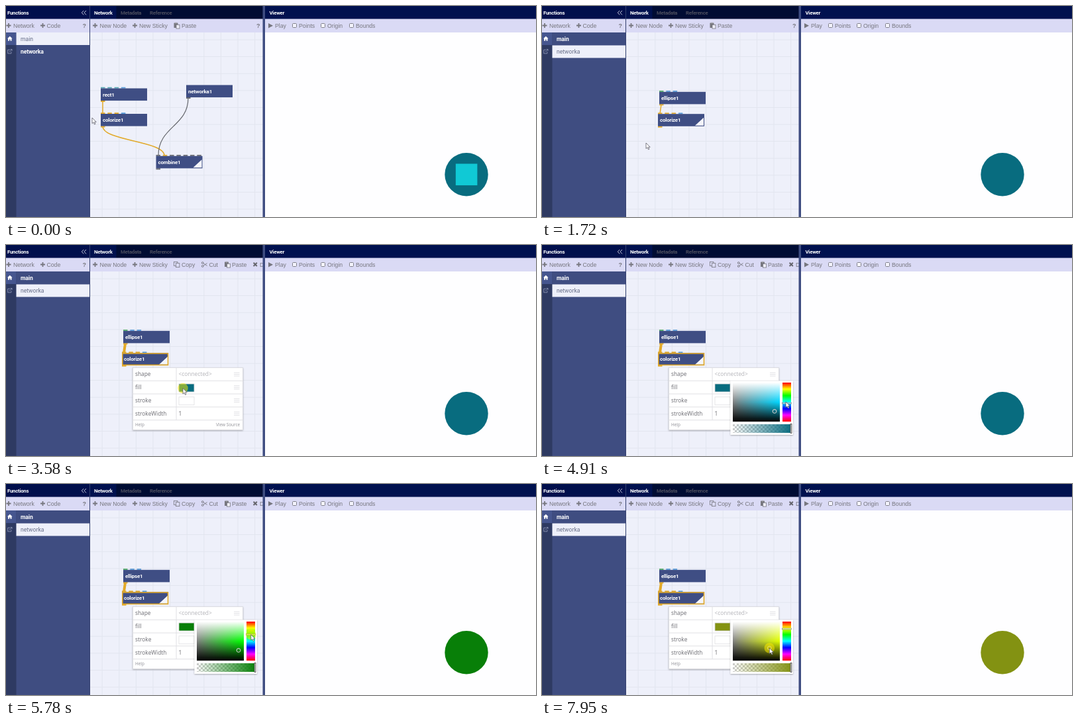
Recreate the animation shown at these times as an HTML page. Size 800 by 319 pixels, loop 8 s.

```html
<!DOCTYPE html>
<html lang="en">
<head>
<meta charset="utf-8">
<title>Node editor</title>
<style>
html, body { margin: 0; width: 100%; height: 100%; overflow: hidden; background: #fefeff; }
svg { display: block; width: 100vw; height: 100vh; }
text { white-space: pre; }
.bold { font: 700 8px Roboto, sans-serif; letter-spacing: -.22px; fill: #fff; }
.tab { font: 700 7.8px Roboto, sans-serif; letter-spacing: -.25px; fill: #fff; }
.dim { fill: #4b4d5e; }
.row { font: 700 8.6px Roboto, sans-serif; letter-spacing: -.15px; fill: #fff; }
.row.active { font-weight: 400; letter-spacing: 0; fill: #666d88; }
.tool { font: 8.7px "Liberation Sans", Arial, sans-serif; fill: #77777f; }
.help { font: 700 9px "Liberation Sans", Arial, sans-serif; fill: #77777f; }
.label { font: 8.3px "Noto Sans", sans-serif; fill: #74747a; }
.faint { fill: #b9b9be; }
.foot { font: 6.4px "Noto Sans", sans-serif; fill: #96969c; }
</style>
</head>
<body>
<svg id="stage" viewBox="0 0 800 319" preserveAspectRatio="none">
  <defs>
    <linearGradient id="toGrey"><stop stop-color="#808080"/><stop offset="1" stop-color="#808080" stop-opacity="0"/></linearGradient>
    <linearGradient id="light" x2="0" y2="1">
      <stop stop-color="#fff"/><stop offset=".5" stop-color="#fff" stop-opacity="0"/>
      <stop offset=".5" stop-color="#000" stop-opacity="0"/><stop offset="1"/>
    </linearGradient>
    <linearGradient id="hues" x2="0" y2="1"></linearGradient>
    <linearGradient id="alpha">
      <stop class="tint" stop-opacity="0"/><stop class="tint" offset="1"/>
    </linearGradient>
    <pattern id="checker" x="288" y="271" width="6" height="6" patternUnits="userSpaceOnUse">
      <path d="M0 0h6v6h-6z" fill="#fff"/><path d="M0 0h3v6h3v-3h-6z" fill="#ccc"/>
    </pattern>
    <filter id="shadow" x="-10%" y="-10%" width="120%" height="125%">
      <feDropShadow dx="0" dy="1" stdDeviation="1.3" flood-opacity=".3"/>
    </filter>
  </defs>
</svg>
<script>
const LOOP = 8000;
const NAVY = '#3f4e84', ORANGE = '#e2a928', BLUE = '#5b9fdc', TEAL = '#58a9b4', GREEN = '#4fae63', GREY = '#67696f';
const stage = document.getElementById('stage');

const rect = (x, y, w, h, fill, more = '') => `<rect x="${x}" y="${y}" width="${w}" height="${h}" fill="${fill}" ${more}/>`;
const text = (x, y, str, cls) => `<text x="${x}" y="${y}" class="${cls}">${str}</text>`;
const line = (d, stroke, width = 1) => `<path d="${d}" fill="none" stroke="${stroke}" stroke-width="${width}"/>`;
const group = (id, body) => `<g id="${id}">${body}</g>`;

const plus = x => line(`M${x} 29.5h7m-3.5 -3.5v7`, '#77777f', 1.8);
const pasteIcon = x => rect(x, 25.5, 6, 7.5, '#77777f', 'rx=".6"')
  + rect(x + 1.7, 24.8, 2.6, 1.6, '#aaaab4') + rect(x + 3.5, 28.3, 5, 5.8, '#eeeef8', 'stroke="#77777f" stroke-width=".8"');
const copyIcon = x => [0, 3].map(d =>
  rect(x + d, 25.5 + d * .7, 5.4, 6, '#dadaf5', 'stroke="#77777f" stroke-width=".8"')).join('');
const scissors = x => line(`M${x + 2.5} 27.3l6 4.2M${x + 2.5} 31.7l6 -4.2`, '#77777f', .9)
  + [27, 32].map(y => `<circle cx="${x + 1.7}" cy="${y}" r="1.4" fill="none" stroke="#77777f" stroke-width=".9"/>`).join('');
const checkbox = (x, label) => rect(x + .5, 26.5, 6, 6, '#f4f4fd', 'rx="1" stroke="#77777f" stroke-width=".9"')
  + text(x + 10, 32.7, label, 'tool');

function node(x, y, name, inputs, output, rendered) {
  return inputs.map((c, i) => rect(x + i * 10.3, y - 1.8, 6.5, 1.8, c)).join('')
    + rect(x, y + 18.5, 6.5, 2, output)
    + rect(x, y, 70, 18.6, NAVY)
    + text(x + 3, y + 12.2, name, 'bold')
    + (rendered ? `<path d="M${x + 69} ${y + 5.5}v12h-13z" fill="#f4f5fb"/>` : '');
}

function sidebar(id, activeRow) {
  const rows = ['main', 'networka'].map((name, i) => {
    const y = 40 + i * 19.5, active = i === activeRow;
    return (active ? rect(15.5, y, 110.5, 19, '#eef0fa') : '')
      + text(22, y + 12.6, name, active ? 'row active' : 'row');
  });
  return group(id, rows.join(''));
}

function grid() {
  let d = '';
  for (let x = 145.2; x < 388; x += 25.6) d += `M${x} 40v279`;
  for (let y = 51; y < 319; y += 25.6) d += `M127 ${y}h261`;
  return rect(127, 40, 261, 279, '#eef0fa') + line(d, '#e2e5ef', 1);
}

function mainNetwork() {
  return line('M146 144V163M146 182C146 204 239 204 239 226', ORANGE, 1.5)
    + line('M275 139C275 182 230 182 230 226', GREY, 1.2)
    + node(143, 124.5, 'rect1', [TEAL, TEAL, TEAL, BLUE], ORANGE)
    + node(143, 163, 'colorize1', [ORANGE, ORANGE, ORANGE, BLUE], ORANGE)
    + node(272, 119.5, 'networka1', [], GREY)
    + node(226.5, 226.8, 'combine1', [GREY, ORANGE, GREY, GREY, GREY, GREY, GREY], GREY, true);
}

function subNetwork() {
  return `<path id="link" d="M180 149L178 163" stroke="${ORANGE}"/>`
    + node(177, 129.8, 'ellipse1', [GREEN, BLUE, BLUE], ORANGE)
    + node(175, 163.2, 'colorize1', [ORANGE, ORANGE, ORANGE, BLUE], ORANGE, true);
}

function panel() {
  const names = ['shape', 'fill', 'stroke', 'strokeWidth'];
  const rows = names.map((name, i) => {
    const y = 185.5 + i * 19.8;
    return text(195, y + 12.7, name, 'label')
      + line(`M191 ${y + 19.8}h167`, '#e0e0e4')
      + line(`M344 ${y + 7.5}h8.5m-8.5 2.5h8.5m-8.5 2.5h8.5`, '#dedee2', .9);
  });
  return rect(175.8, 164, 68.7, 17.4, 'none', `stroke="${ORANGE}" stroke-width="1.6"`)
    + rect(191.5, 185.5, 166, 94, '#fff', 'filter="url(#shadow)" stroke="#d0d0d6" stroke-width=".6"')
    + rows.join('') + line('M257 185.5v79.2', '#e0e0e4')
    + text(260.5, 198.2, '&lt;connected&gt;', 'label faint')
    + rect(261, 210, 23, 12, '#fff', 'id="swatch" stroke="#d4d4d8" stroke-width=".8"')
    + rect(261, 229.8, 23, 12, '#fff', 'stroke="#dedee2" stroke-width=".8"')
    + text(260.5, 257.6, '1', 'label')
    + text(195, 274.2, 'Help', 'foot') + text(317, 274.2, 'View Source', 'foot');
}

function picker() {
  return rect(284.5, 205.5, 94.5, 81.5, '#fff', 'filter="url(#shadow)"')
    + rect(288, 208, 71, 59, '', 'id="pure"') + rect(288, 208, 71, 59, 'url(#toGrey)') + rect(288, 208, 71, 59, 'url(#light)')
    + rect(363, 208, 13, 59, 'url(#hues)')
    + rect(288, 271, 89, 13, 'url(#checker)') + rect(288, 271, 89, 13, 'url(#alpha)')
    + rect(375, 270.5, 2, 14, '#ddd', 'stroke="#444" stroke-width=".8"')
    + rect(362.5, -1, 14, 2, '#fff', 'id="hueMark" fill-opacity=".6" stroke="#777" stroke-width=".6"')
    + '<circle id="toneMark" r="2.8" fill="none" stroke="#c8c8c8" stroke-width="1.1"/>';
}

document.getElementById('hues').innerHTML = [0, 1, 2, 3, 4, 5, 6]
  .map(i => `<stop offset="${i / 6}" stop-color="hsl(${i * 60},100%,50%)"/>`).join('');

stage.insertAdjacentHTML('beforeend', [
  grid(),
  group('main', mainNetwork()),
  group('sub', subNetwork()),
  rect(0, 40, 126, 279, '#3f4d81'), rect(0, 40, 15.5, 279, '#2e3a62'), rect(0, 40, 15.5, 19, '#46568f'),
  '<path d="M2 49.3l3.8 -3.6 3.8 3.6h-1.1v3.5h-2v-2.4h-1.4v2.4h-2v-3.5z" fill="#fff"/>',
  line('M6 66.2h-3.3v5.6h5.2v-2.6M4.8 69.7l4 -4M6.7 65.5h2.3v2.3', '#8d96b5', .9),
  sidebar('mainRows', 0), sidebar('subRows', 1),
  rect(0, 0, 388, 20, '#000c33'), rect(0, 0, 126, 20, '#000f4c'), rect(127, 0, 39.5, 20, '#00114f'),
  text(2, 12.8, 'Functions', 'tab'), line('M117.3 7l-3 3.2 3 3.2M121 7l-3 3.2 3 3.2', '#c5c8da'),
  text(133, 12.8, 'Network', 'tab'), text(173, 12.8, 'Metadata', 'tab dim'), text(217, 12.8, 'Reference', 'tab dim'),
  rect(0, 19.5, 388, 20.5, '#dadaf5'),
  plus(.5), text(11, 32.7, 'Network', 'tool'), plus(52), text(61.5, 32.7, 'Code', 'tool'), text(115.5, 32.7, '?', 'help'),
  plus(131), text(141.5, 32.7, 'New Node', 'tool'), plus(191), text(201, 32.7, 'New Sticky', 'tool'),
  group('plainTools', pasteIcon(253.5) + text(265, 32.7, 'Paste', 'tool') + text(378, 32.7, '?', 'help')),
  group('nodeTools', copyIcon(253.5) + text(265, 32.7, 'Copy', 'tool') + scissors(295) + text(306.5, 32.7, 'Cut', 'tool')
    + pasteIcon(330) + text(341, 32.7, 'Paste', 'tool')
    + line('M373.6 26.8l5.2 5.2m0 -5.2l-5.2 5.2', '#66666e', 2) + text(383, 32.7, 'Delete', 'tool')),
  rect(126, 0, 1, 319, '#34416f'),
  rect(388, 0, 412, 319, '#fefeff'), rect(388, 0, 412, 20, '#00114f'), rect(388, 19.5, 412, 20.5, '#dadaf5'),
  rect(387.5, 0, 3.5, 319, '#3f4d81'),
  text(397.5, 12.8, 'Viewer', 'tab'),
  '<path d="M396 26v7.4l7 -3.7z" fill="#77777f"/>', text(406, 32.7, 'Play', 'tool'),
  checkbox(432, 'Points'), checkbox(475, 'Origin'), checkbox(518, 'Bounds'),
  '<circle id="disc" cx="695" cy="254.7" r="32.7"/>',
  rect(678.8, 238.5, 32.6, 32.6, '#10c9d5', 'id="square"'),
  group('panel', panel()), group('picker', picker()),
  '<circle id="press" r="7.8" fill="#ffee00" fill-opacity=".5"/>',
  '<path id="cursor" d="M0 0v8.6l2 -1.8 1.5 3.2 1.4 -.6 -1.4 -3.1h2.7z" fill="#fff" stroke="#4a4a55" stroke-width=".7"/>'
].join(''));

const el = {};
stage.querySelectorAll('[id]').forEach(e => el[e.id] = e);
const tints = stage.querySelectorAll('.tint');

// start, end, steps, x, y, eased
const MOVES = [
  [80, 610, 8, 61, 66, true],
  [1340, 1720, 6, 157, 207],
  [1796, 2100, 5, 208, 174],
  [2800, 3580, 11, 267, 216.5, true],
  [4150, 4910, 11, 368, 237, true],
  [5290, 5990, 10, 370.5, 223.7],
  [6140, 6300, 3, 371, 220.5],
  [6480, 6480, 1, 371, 219],
  [6860, 7230, 6, 352, 252],
  [7390, 7390, 1, 351, 251.4],
  [7570, 7950, 6, 343.3, 248]
];
const PRESSES = [[790, 1030], [2270, 2410], [3580, 3650], [5150, 6700], [7570, LOOP]];
const OPEN_SUB = 870, SELECT = 2340, OPEN_PICKER = 3650, HUE_DRAG = 5150, HUE_END = 6700, TONE_DRAG = 7570;

function cursorAt(t) {
  let x = 130, y = 169;
  for (const [start, end, steps, toX, toY, eased] of MOVES) {
    if (t < start) break;
    const step = end > start ? Math.floor((t - start) / (end - start) * (steps - 1) + 1e-6) + 1 : steps;
    let p = Math.min(1, step / steps);
    if (eased) p = p * p * (3 - 2 * p);
    x += (toX - x) * p;
    y += (toY - y) * p;
  }
  return { x, y };
}

const show = (id, on) => el[id].setAttribute('display', on ? 'inline' : 'none');
const place = (id, x, y) => el[id].setAttribute('transform', `translate(${x} ${y})`);

function render(t) {
  const cursor = cursorAt(t);
  const hueY = t < HUE_DRAG ? 239.1 : cursorAt(Math.min(t, HUE_END)).y;
  const tone = t < TONE_DRAG ? { x: 351, y: 251.4 } : cursor;
  const hue = (hueY - 208) / 59 * 360;
  const color = `hsl(${hue},${(tone.x - 288) / 71 * 100}%,${(267 - tone.y) / 59 * 100}%)`;
  const inSub = t >= OPEN_SUB, selected = t >= SELECT;

  ['main', 'mainRows', 'square'].forEach(id => show(id, !inSub));
  ['sub', 'subRows'].forEach(id => show(id, inSub));
  ['panel', 'nodeTools'].forEach(id => show(id, selected));
  show('plainTools', !selected);
  show('picker', t >= OPEN_PICKER);
  show('press', PRESSES.some(([from, to]) => t >= from && t < to));
  el.link.setAttribute('stroke-width', selected ? 4 : 1.5);

  el.disc.setAttribute('fill', color);
  el.swatch.setAttribute('fill', color);
  el.pure.setAttribute('fill', `hsl(${hue},100%,50%)`);
  tints.forEach(s => s.setAttribute('stop-color', color));

  place('hueMark', 0, hueY);
  place('toneMark', tone.x, tone.y);
  place('press', cursor.x, cursor.y);
  place('cursor', cursor.x, cursor.y);
}

const begin = performance.now();
function tick() {
  render((performance.now() - begin) % LOOP);
  requestAnimationFrame(tick);
}
tick();
</script>
</body>
</html>
```
